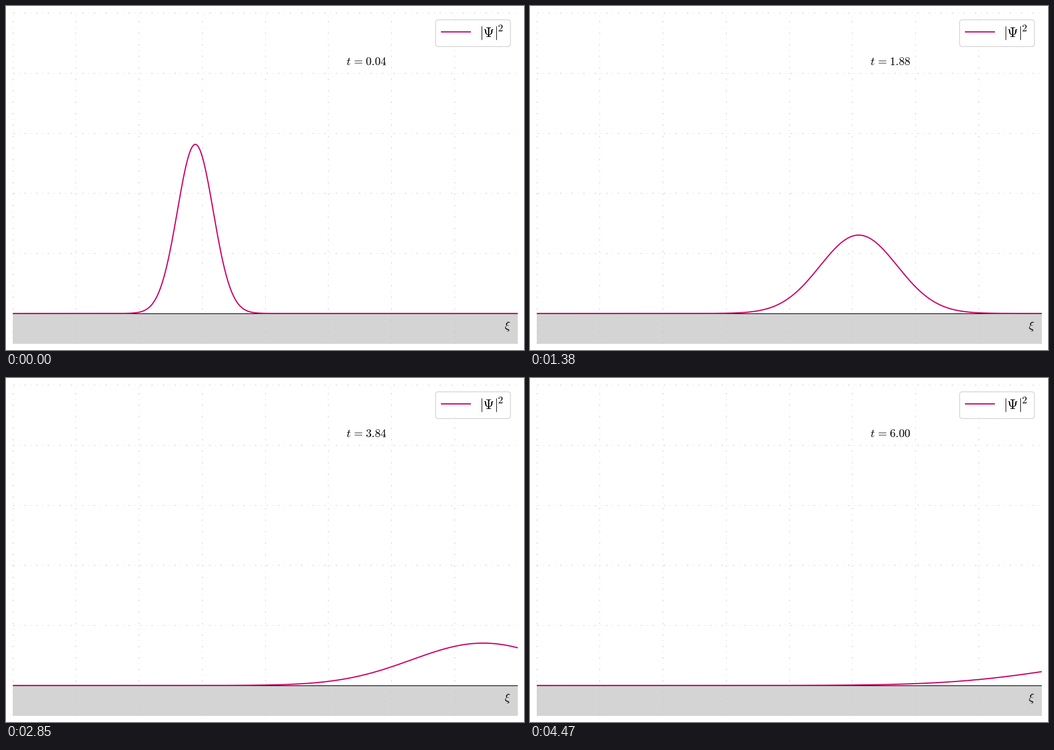
Animation of 917 by 611 pixels, one loop 5.4 s. Source, as a matplotlib script:

```python
import numpy as np
import matplotlib.pyplot as plt
from matplotlib.animation import FuncAnimation
from matplotlib.patches import FancyBboxPatch

W, H, DPI = 917, 611, 100
FRAMES, INTERVAL = 180, 30
STEPS, DT = 150, 0.04          # the packet moves for STEPS frames, then rests
X0, SPEED = -3.0, 3.0
PINK = "#cc0066"

plt.rcParams["mathtext.fontset"] = "cm"


def pt(px):
    """Pixels to points."""
    return px * 72 / DPI


def density(x, t):
    """Probability density of a freely spreading Gaussian packet."""
    spread = 1 + t * t
    return np.exp(-(x - X0 - SPEED * t) ** 2 / spread) / np.sqrt(np.pi * spread)


fig = plt.figure(figsize=(W / DPI, H / DPI), dpi=DPI, facecolor="white")

# Plot area
left, right, top, bottom = 11.5, 905.5, 12, 599.5
ax = fig.add_axes([left / W, 1 - bottom / H, (right - left) / W, (bottom - top) / H])
ax.set(xlim=(-10, 10), ylim=(-0.1, 1))
ax.set_xticks(np.arange(-10, 10, 2.5))
ax.set_yticks(np.arange(0, 1.1, 0.2))
ax.tick_params(length=0, labelbottom=False, labelleft=False)
for spine in ax.spines.values():
    spine.set_visible(False)
ax.grid(color="0.75", lw=pt(0.85), ls=(0, (3, 10, 1, 10)))
ax.axhspan(-0.1, 0, facecolor="#d4d4d4", edgecolor="none")
ax.axhline(0, color="black", lw=pt(1.2))

x = np.linspace(-10, 10, 1000)
curve, = ax.plot(x, density(x, 0), color=PINK, lw=pt(2.1), zorder=3)

# Overlay in pixel coordinates for the legend and labels
stage = fig.add_axes([0, 0, 1, 1])
stage.set(xlim=(0, W), ylim=(H, 0))
stage.axis("off")


def label(px, py, size, text=""):
    return stage.text(px, py, text, fontsize=pt(size), color="black",
                      ha="left", va="baseline")


stage.add_patch(FancyBboxPatch(
    (760.5, 24.5), 132.5, 47.5, boxstyle="round,pad=0,rounding_size=5",
    facecolor=(1, 1, 1, 0.8), edgecolor=(0.8, 0.8, 0.8, 0.8), lw=pt(1.5)))
stage.plot([770.5, 822], [46, 46], color=PINK, lw=pt(2.1))
label(837.5, 55, 24.7, r"$|\Psi|$")
label(870.5, 45, 18, "$2$")
label(882.5, 573.5, 20.5, r"$\xi$")
clock = label(602.5, 105, 20.5)


def update(i):
    n = min(i + 1, STEPS)
    curve.set_ydata(density(x, (n + 1) * DT))
    clock.set_text(rf"$t\hspace{{0.117}}=\hspace{{0.117}}{n * DT:.2f}$")
    return curve, clock


anim = FuncAnimation(fig, update, frames=FRAMES, interval=INTERVAL,
                     repeat=True, repeat_delay=0, blit=False)
plt.show()
```
